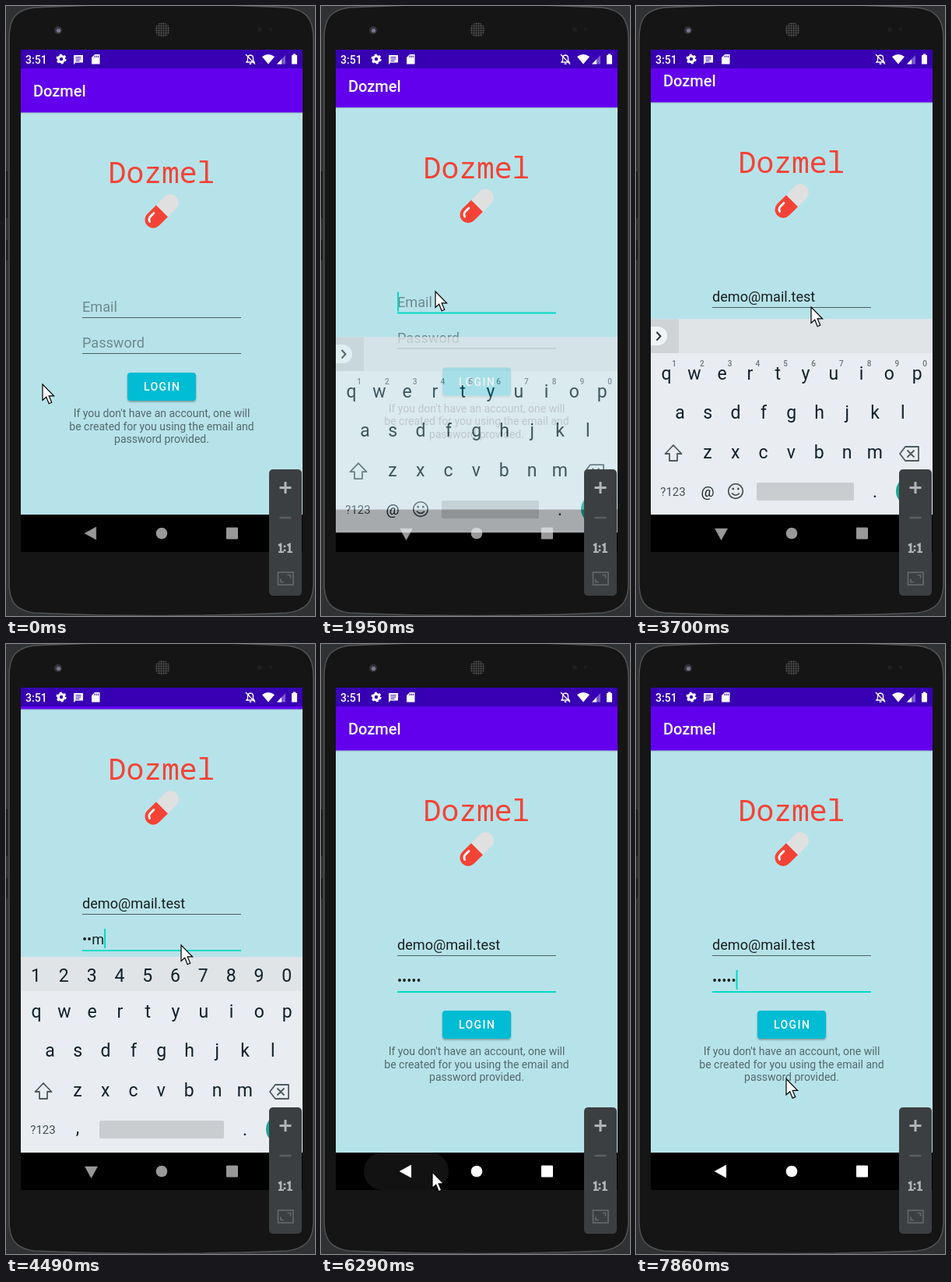
An HTML page for the animation above (8000 ms loop, 397x782 px).

```html
<!DOCTYPE html>
<html lang="en">
<head>
<meta charset="utf-8">
<title>Login demo</title>
<style>
  html, body { margin: 0; width: 100%; height: 100%; overflow: hidden; background: #2f3133; }
  svg { display: block; width: 397px; height: 782px; font-family: Roboto, sans-serif; }
  .mono { font-family: "Noto Sans Mono", "DejaVu Sans Mono", monospace; }
  .mid { text-anchor: middle; }
  .key { font-size: 23px; fill: #10202a; text-anchor: middle; }
  .field { font-size: 18.1px; }
</style>
</head>
<body>
<svg viewBox="0 0 397 782" xmlns="http://www.w3.org/2000/svg">
  <defs>
    <clipPath id="screen"><rect x="19" y="56" width="362" height="644"/></clipPath>
    <pattern id="mesh" width="3" height="3" patternUnits="userSpaceOnUse">
      <rect width="3" height="3" fill="#1b1b1b"/><circle cx="1.5" cy="1.5" r="1" fill="#5c5c5c"/>
    </pattern>
    <linearGradient id="shade" x2="0" y2="1">
      <stop stop-color="#000" stop-opacity=".2"/><stop offset="1" stop-color="#000" stop-opacity="0"/>
    </linearGradient>
    <filter id="lift" x="-10%" y="-20%" width="120%" height="150%">
      <feDropShadow dx="0" dy="1.5" stdDeviation="1.2" flood-opacity=".35"/>
    </filter>
  </defs>

  <!-- phone body -->
  <rect width="397" height="782" fill="#2f3133"/>
  <path d="M4 42C4 14 14 5 36 2Q200-6 361 2C384 5 395 14 395 42V740C395 765 384 775 361 778Q200 785 36 778C14 775 4 765 4 740Z"
    fill="#151515" stroke="#505254" stroke-width="1.5"/>
  <path d="M1 212v60M1 300v26" stroke="#1a1b1c" stroke-width="2"/>
  <circle cx="67" cy="31" r="5" fill="#34343a"/><circle cx="67.5" cy="31.5" r="2.6" fill="#77758c"/>
  <circle cx="201" cy="30.5" r="9.5" fill="url(#mesh)"/>
  <circle cx="326" cy="30" r="3" fill="#1f1f1f"/><circle cx="340" cy="30" r="2" fill="#202020"/>

  <g clip-path="url(#screen)">
    <rect x="19" y="56" width="362" height="644"/>
    <g id="page">
      <rect x="19" y="80" width="362" height="572" fill="#b6e3e9"/>
      <rect x="19" y="136.5" width="362" height="2" fill="url(#shade)"/>
      <rect x="19" y="80" width="362" height="56.5" fill="#6200ee"/>
      <text x="35" y="116" font-size="20" font-weight="500" fill="#fff">Dozmel</text>
      <text class="mono mid" x="200" y="227" font-size="38" fill="#f44336">Dozmel</text>
      <g transform="translate(200.2 263) rotate(-45)">
        <path d="M.5-10.6H-15.7a10.6 10.6 0 0 0 0 21.2H.5z" fill="#f44336"/>
        <path d="M.5-10.6H15.700a10.6 10.6 0 0 1 0 21.2H.5z" fill="#e0e0e0"/>
        <path d="M-20.5-1.5q1.500-4 5.500-4h6" fill="none" stroke="#fff" stroke-width="2.800" stroke-linecap="round"/>
      </g>
      <text id="email" class="field" x="98" y="392"></text>
      <rect id="emailLine" x="98" width="204"/>
      <text id="pass" class="field" x="98" y="438"></text>
      <rect id="passLine" x="98" width="204"/>
      <rect id="caret" width="2" height="25" fill="#03dac5"/>
      <rect x="156" y="470" width="88" height="36" rx="4" fill="#00bcd4" filter="url(#lift)"/>
      <text x="177" y="493" font-size="14" font-weight="500" letter-spacing="1.400" fill="#fff">LOGIN</text>
      <g class="mid" font-size="14" fill="#000" fill-opacity=".54">
        <text x="200" y="527">If you don't have an account, one will</text>
        <text x="200" y="543.500">be created for you using the email and</text>
        <text x="200" y="560">password provided.</text>
      </g>
    </g>

    <!-- status bar -->
    <rect x="19" y="56" width="362" height="24" fill="#3700b3"/>
    <g fill="#fff">
      <text x="25" y="73.500" font-size="14" font-weight="500">3:51</text>
      <circle cx="71" cy="68" r="3.700" fill="none" stroke="#fff" stroke-width="3"/>
      <circle cx="71" cy="68" r="5.700" fill="none" stroke="#fff" stroke-width="1.800" stroke-dasharray="3 2.970"/>
      <path d="M87 63h12v9.500h-9.500l-2.500 2.500z"/>
      <path d="M89.500 65.700h7M89.500 68h7M89.500 70.300h5" stroke="#3700b3"/>
      <path d="M114 62h6.500v12.500h-10.500v-8.500z"/>
      <path d="M114 63.500v2.500M116.200 63.500v2.500M118.400 63.500v2.500" stroke="#3700b3"/>
      <path d="M309 72h10l-1.500-2v-3.500q0-3-3.500-3.500-3.500.500-3.500 3.500v3.500zM308 62l12 12.500" fill="none" stroke="#fff" stroke-width="1.300"/>
      <path d="M312.700 73.300h2.600v1.500h-2.600z"/>
      <path d="M329 65q8-6 16 0l-8 9.500z"/>
      <path d="M348 74.500l11-11.500v11.500z" opacity=".35"/>
      <path d="M348 74.500l6-6.300v6.300z"/>
      <path d="M368.700 61.500h3.600v1.500h1.700v11.500h-7v-11.500h1.700z"/>
    </g>

    <!-- navigation bar -->
    <rect id="ripple" x="55" y="652" width="109" height="48" rx="24" fill="#fff"/>
    <g id="nav">
      <path id="back" d="M-7.500 0L7-8V8z" stroke-width=".6" stroke-linejoin="round"/>
      <circle cx="200" cy="676" r="7.300"/>
      <rect x="283" y="668.500" width="15" height="15" rx="1"/>
    </g>

    <g id="board"></g>
  </g>

  <!-- zoom panel -->
  <rect x="338" y="594" width="42" height="162" rx="5" fill="#3c3f41"/>
  <path d="M351.500 617.500h15M359 610v15" stroke="#b2b4b6" stroke-width="3"/>
  <path d="M351.500 656h15" stroke="#5c5f61" stroke-width="2.500"/>
  <g fill="none" stroke="#b2b4b6" stroke-width="2.600">
    <path d="M350 691.500l3-1.500v10M361.500 691.500l3-1.500v10"/>
    <path d="M358 691.500v2.600M358 696.500v2.600"/>
  </g>
  <path d="M350 700h7M361.500 700h6.500" stroke="#b2b4b6" stroke-width="2"/>
  <g fill="none" stroke="#646769" stroke-width="1.700">
    <rect x="349.500" y="726" width="19.500" height="16"/>
    <path d="M361.500 729.500h4v4M357 738.500h-4v-4"/>
  </g>

  <path id="pointer" d="M0 0V20.500L4.700 16.200L8.200 24.700L11.700 23.200L8.200 14.900H14.600Z" fill="#fff" stroke="#000" stroke-width="1.200"/>
</svg>

<script>
const LOOP = 8000;
const EMAIL = "demo@mail.test";
const SECRET = "lemon";
const $ = id => document.getElementById(id);
const set = (id, attrs) => { for (const k in attrs) $(id).setAttribute(k, attrs[k]); };

// Screen updates: [first, last, count]
const runs = [
  [280, 940, 6], [1090, 1220, 2], [1500, 1950, 4], [2100, 2490, 4], [2610, 2610, 1],
  [2890, 3700, 7], [3820, 3940, 2], [4220, 4610, 4], [5170, 5710, 5], [5990, 6440, 4],
  [6570, 6950, 4], [7100, 7580, 5], [7860, 7860, 1]
];
const ticks = [0];
for (const [a, b, n] of runs)
  for (let i = 0; i < n; i++) ticks.push(n > 1 ? a + (b - a) * i / (n - 1) : a);

// Pointer path: [time, x, y]
const path = [
  [0, 47, 485], [280, 62, 520], [544, 180, 660], [676, 270, 676], [808, 288, 580],
  [940, 245, 472], [1220, 162, 377], [1500, 147, 366], [2230, 147, 366], [2490, 236, 409],
  [2610, 225, 386], [5170, 225, 386], [5305, 205, 460], [5575, 148, 640], [5710, 141, 656],
  [5990, 143, 677], [6440, 143, 677], [6697, 180, 610], [6950, 250, 500], [7220, 301, 540],
  [7460, 215, 562], [7580, 192, 560], [7860, 193, 557.5], [LOOP, 193, 557.5]
];

const ramp = (t, a, b) => Math.min(1, Math.max(0, (t - a) / (b - a)));
const easeOut = u => 1 - (1 - u) ** 3;
const smooth = u => u * u * (3 - 2 * u);

function pointerAt(t) {
  const i = Math.max(1, path.findIndex(p => p[0] >= t));
  const [a, x0, y0] = path[i - 1], [b, x1, y1] = path[i];
  const u = ramp(t, a, b);
  return [x0 + (x1 - x0) * u, y0 + (y1 - y0) * u];
}

function buildBoard() {
  const step = 35.8;
  const text = (c, x, y, extra = "") => `<text class="key" x="${x}" y="${y}" ${extra}>${c}</text>`;
  const row = (chars, x, y, extra) => [...chars].map((c, i) => text(c, x + i * step, y, extra)).join("");
  const space = x => `<rect x="${x}" y="611" width="${280 - x}" height="23" rx="2" fill="#c9cdd0"/>`;
  const digits = "1234567890";
  $("board").innerHTML = `
    <rect x="19" y="401.5" width="362" height="250.5" fill="#e9edf1"/>
    <rect x="19" y="401.5" width="362" height="43.5" fill="#e0e4e7"/>
    ${row("qwertyuiop", 39, 479)}${row("asdfghjkl", 56.5, 529)}${row("zxcvbnm", 92, 580)}
    <g fill="none" stroke="#4d5a60" stroke-width="1.8" stroke-linejoin="round">
      <path d="M48 563l10.5 11h-5.5v9h-10v-9h-5.5z"/>
      <path d="M346 565h17v18h-17l-7-9zM348.5 569.5l9 9M357.5 569.5l-9 9"/>
    </g>
    ${text("?123", 47.5, 628, 'style="font-size:15px;fill:#435056"')}${text(".", 307, 630)}
    <circle cx="353" cy="622" r="19" fill="#1fa294"/>
    <g id="mailKeys">
      <rect x="19" y="401.5" width="36" height="43.5" fill="#cfd3d6"/>
      <path d="M19 411h9a12 12 0 0 1 0 24h-9z" fill="#f1f4f6"/>
      <path d="M26.500 418l5 5.300-5 5.300" fill="none" stroke="#28343a" stroke-width="2"/>
      ${row(digits, 49, 462, 'style="font-size:10px;font-weight:500;fill:#6b767b"')}
      ${text("@", 92, 629, 'style="font-size:19px"')}${space(155)}
      <g fill="none" stroke="#435056" stroke-width="1.700">
        <circle cx="128" cy="622" r="9.300"/><path d="M123 624.500q5 5.500 10 0"/>
      </g>
      <circle cx="124.700" cy="619" r="1.400" fill="#435056"/><circle cx="131.300" cy="619" r="1.400" fill="#435056"/>
    </g>
    <g id="passKeys">${row(digits, 38.5, 433)}${text(",", 92, 628)}${space(120)}</g>`;
}

function fill(id, value, hint) {
  $(id).textContent = value || hint;
  set(id, { "fill-opacity": value ? 0.87 : 0.4 });
}

function line(id, y, focused) {
  set(id, focused
    ? { y, height: 2, fill: "#03dac5", "fill-opacity": 1 }
    : { y, height: 1, fill: "#000", "fill-opacity": 0.58 });
}

function emailChars(t) {
  if (t < 2610) return 0;
  return t < 2890 ? 1 : Math.min(EMAIL.length, 3 + 2 * Math.floor((t - 2890) / 135 + 0.01));
}

function draw(t) {
  const onEmail = t >= 1800 && t < 3700, onPass = t >= 3700;

  // window pan and keyboard
  const hide = easeOut(ramp(t, 6000, 6270));
  const pan = 13 * smooth(ramp(t, 1850, 2050)) + 40 * easeOut(ramp(t, 3700, 3900));
  const shown = easeOut(ramp(t, 1850, 2140)) * (1 - hide);
  set("page", { transform: `translate(0 ${-pan * (1 - hide)})` });
  set("board", { transform: `translate(0 ${82 * (1 - shown)})`, opacity: shown });
  set("mailKeys", { visibility: t < 3820 ? "visible" : "hidden" });
  set("passKeys", { visibility: t < 3820 ? "hidden" : "visible" });

  // fields
  const typed = t < 4220 ? 0 : Math.min(5, 1 + Math.floor((t - 4220) / 97.5));
  const dots = t < 6110 ? Math.max(0, typed - 1) : typed;
  fill("email", EMAIL.slice(0, emailChars(t)), "Email");
  fill("pass", "•".repeat(dots) + SECRET.slice(dots, typed), "Password");
  line("emailLine", 399, onEmail);
  line("passLine", 445, onPass);

  const blank = (t >= 5170 && t < 5640) || (t >= 6110 && t < 6560) || (t >= 7100 && t < 7560);
  const filled = onEmail ? emailChars(t) : typed;
  const width = filled ? $(onEmail ? "email" : "pass").getComputedTextLength() : 0;
  set("caret", {
    x: 98 + width, y: onEmail ? 373 : 418,
    visibility: (onEmail || onPass) && !blank ? "visible" : "hidden"
  });

  // navigation
  const down = t >= 1850 && t < 6100;
  const tone = t < 6100 ? "#999" : "#fff";
  set("nav", { fill: tone });
  set("back", { stroke: tone, transform: down ? "translate(109.5 677) rotate(-90)" : "translate(108.7 676)" });
  set("ripple", { opacity: 0.07 * ramp(t, 5900, 6100) * (1 - ramp(t, 6450, 6750)) });

  set("pointer", { transform: `translate(${pointerAt(t)})` });
}

function frame() {
  const t = performance.now() % LOOP;
  draw(ticks.filter(k => k <= t + 1).pop());
  requestAnimationFrame(frame);
}

buildBoard();
frame();
</script>
</body>
</html>
```
